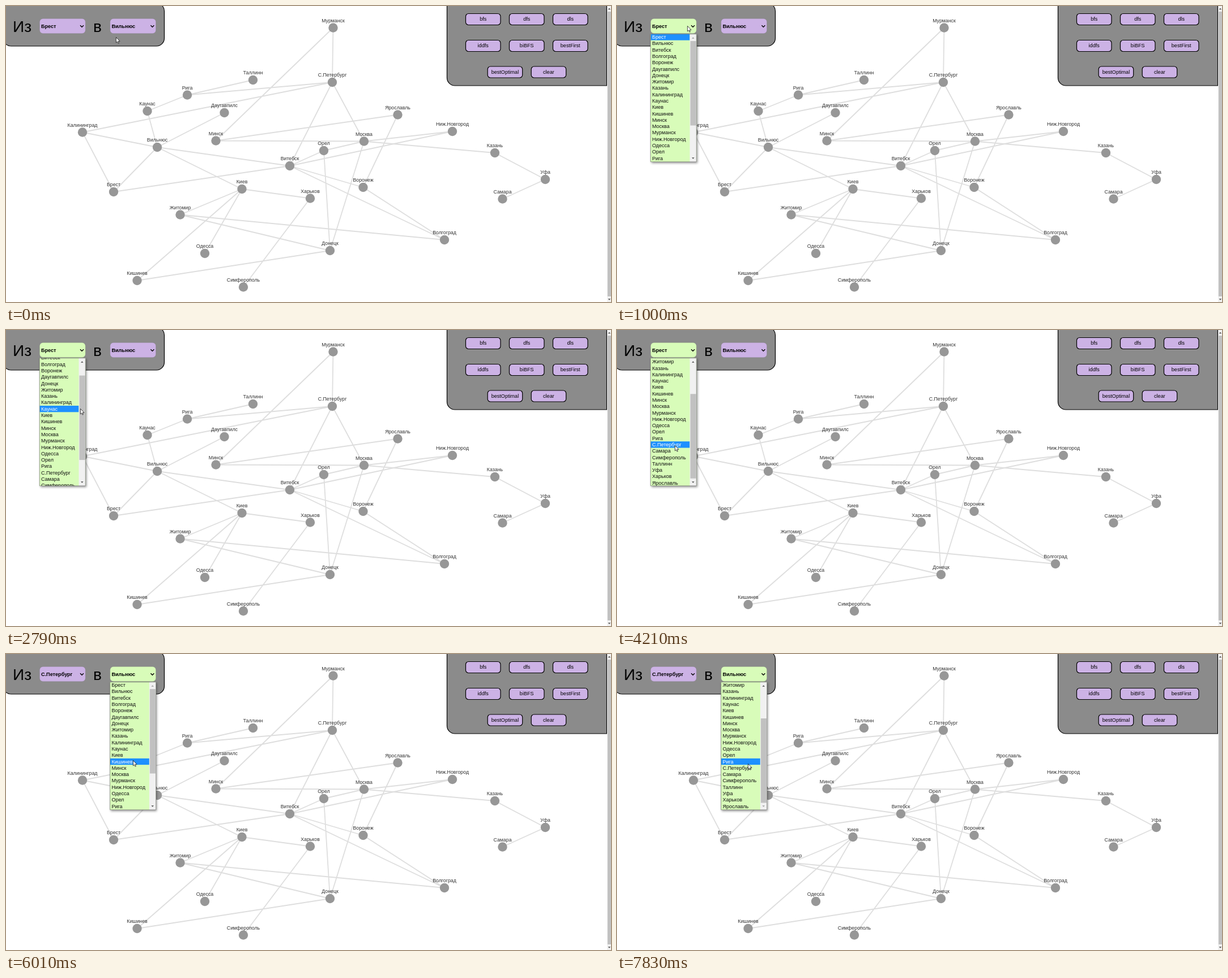
An HTML page with a canvas that plays this animation: 1068 by 524 pixels, repeating every 8000 ms.

```html
<!DOCTYPE html>
<html lang="ru">
<head>
<meta charset="utf-8">
<style>
  html, body { margin: 0; width: 100%; height: 100%; overflow: hidden; background: #fff; }
  canvas { display: block; }
</style>
</head>
<body>
<canvas id="stage" width="1068" height="524"></canvas>
<script>
const ctx = document.getElementById('stage').getContext('2d');
const LOOP = 8000;
const FONT = '"Liberation Sans", Arial, sans-serif';
const PURPLE = '#ccb2e5', GREEN = '#d8fcb9', PANEL = '#8b8b8b', BLUE = '#1e90ff';
const ROW = 11.29, LIST_TOP = 49.5, LIST_BOTTOM = 276, MAX_SCROLL = 7;

// City, position, and the cities its roads lead to, in alphabetical order.
const cities = [
  ['Брест', 190, 329, 'Витебск'],
  ['Вильнюс', 267, 250, 'Калининград Даугавпилс Брест Витебск Киев'],
  ['Витебск', 501, 283, 'Орел Воронеж Волгоград Ниж.Новгород'],
  ['Волгоград', 774, 414, ''],
  ['Воронеж', 630.5, 321, 'Волгоград'],
  ['Даугавпилс', 385.5, 189, ''],
  ['Донецк', 572, 433, ''],
  ['Житомир', 307.5, 369.5, 'Донецк Волгоград'],
  ['Казань', 863, 260, 'Уфа'],
  ['Калининград', 135, 223.5, 'Брест'],
  ['Каунас', 249.5, 186, 'Вильнюс'],
  ['Киев', 416.5, 324, 'Житомир Харьков Одесса Кишинев'],
  ['Кишинев', 231.5, 486, 'Донецк'],
  ['Минск', 370.5, 238.5, ''],
  ['Москва', 632, 239.5, 'Минск Ниж.Новгород Казань Донецк'],
  ['Мурманск', 577.5, 38.5, 'Минск С.Петербург'],
  ['Ниж.Новгород', 788, 222, ''],
  ['Одесса', 351, 438, ''],
  ['Орел', 561, 256, 'Москва Донецк'],
  ['Рига', 320, 157.5, 'Каунас'],
  ['С.Петербург', 576, 135, 'Рига Калининград Витебск Москва'],
  ['Самара', 876.5, 341.5, ''],
  ['Симферополь', 419, 497.5, ''],
  ['Таллинн', 436, 131, 'Рига'],
  ['Уфа', 952, 307, 'Самара'],
  ['Харьков', 537, 340.5, 'Симферополь'],
  ['Ярославль', 691.5, 192.5, 'Минск Воронеж']
].map(([name, x, y, roads]) => ({ name, x, y, roads: roads.split(' ').filter(Boolean) }));
const cityByName = Object.fromEntries(cities.map(c => [c.name, c]));

// Each step keeps the values of the one before unless it changes them.
const steps = [
  { t: 0, x: 194, y: 55, from: 'Брест', hover: '', open: '', focus: false, scroll: 0, row: 0 },
  { t: 200, x: 173, y: 47 },
  { t: 400, x: 146, y: 39 },
  { t: 600, x: 129, y: 36, hover: 'from' },
  { t: 800, x: 124, y: 35 },
  { t: 1000, open: 'from' },
  { t: 1390, y: 103, row: 4 },
  { t: 1590, y: 171, row: 10 },
  { t: 1990, x: 126, y: 172, scroll: 7 },
  { t: 2390, x: 131 },
  { t: 2590, y: 157, scroll: 5 },
  { t: 2790, y: 139, scroll: 2.5 },
  { t: 2990, y: 128, scroll: 1 },
  { t: 3210, y: 150, scroll: 4 },
  { t: 3410, y: 171, scroll: 6.9 },
  { t: 3610, x: 139, y: 172 },
  { t: 3810, x: 118, y: 188, row: 19 },
  { t: 4010, x: 106, y: 202, row: 20 },
  { t: 4210, x: 102, y: 204 },
  { t: 4410, open: '', hover: '', from: 'С.Петербург', focus: true, scroll: 0 },
  { t: 4810, x: 126, y: 166 },
  { t: 5010, x: 188, y: 88 },
  { t: 5210, x: 224, y: 46, hover: 'to' },
  { t: 5410, y: 42 },
  { t: 5610, open: 'to', focus: false, row: 1 },
  { t: 5810, y: 112, row: 5 },
  { t: 6010, y: 188, row: 12 },
  { t: 6210, scroll: 7 },
  { t: 6830, x: 225, y: 189, row: 19 },
  { t: 7030, x: 226, y: 190 },
  { t: 7230, x: 228, y: 191 },
  { t: 7430, x: 229, y: 192 },
  { t: 7630, x: 230, y: 193 },
  { t: 7830, x: 231, y: 194 }
];

const stateAt = time => Object.assign({}, ...steps.filter(s => s.t <= time));

function text(str, x, y, size, { color = '#000', align = 'left', weight = '' } = {}) {
  ctx.font = `${weight} ${size}px ${FONT}`;
  ctx.fillStyle = color;
  ctx.textAlign = align;
  ctx.fillText(str, x, y);
}

function rect(x, y, w, h, color) {
  ctx.fillStyle = color;
  ctx.fillRect(x, y, w, h);
}

function box(x, y, w, h, radius, fill, stroke, lineWidth = 1) {
  ctx.beginPath();
  ctx.roundRect(x, y, w, h, radius);
  if (fill) {
    ctx.fillStyle = fill;
    ctx.fill();
  }
  if (stroke) {
    ctx.strokeStyle = stroke;
    ctx.lineWidth = lineWidth;
    ctx.stroke();
  }
}

function polygon(points, x, y) {
  ctx.beginPath();
  points.forEach(([px, py]) => ctx.lineTo(x + px, y + py));
  ctx.closePath();
}

// dir is -1 for up and 1 for down
function scrollArrow(x, y, dir, color) {
  polygon([[-2.3, -1.2 * dir], [2.3, -1.2 * dir], [0, 1.2 * dir]], x, y);
  ctx.fillStyle = color;
  ctx.fill();
}

function drawGraph() {
  ctx.strokeStyle = '#dedede';
  ctx.lineWidth = 1.8;
  ctx.beginPath();
  for (const city of cities) {
    for (const name of city.roads) {
      ctx.moveTo(city.x, city.y);
      ctx.lineTo(cityByName[name].x, cityByName[name].y);
    }
  }
  ctx.stroke();
  for (const { name, x, y } of cities) {
    ctx.beginPath();
    ctx.arc(x, y, 8.2, 0, Math.PI * 2);
    ctx.fillStyle = '#979797';
    ctx.fill();
    text(name, x, y - 10, 8.8, { color: '#343434', align: 'center' });
  }
}

function drawPanels() {
  box(-5, -5, 284.5, 76, 14, PANEL, '#000', 1.2);
  text('Из', 12, 45.5, 28);
  text('в', 154, 45.5, 28);

  box(778.5, -20, 282, 161, [0, 0, 0, 14], PANEL, '#000', 1.2);
  const buttons = [
    [811, 13, ['bfs', 'dfs', 'dls']],
    [811, 60, ['iddfs', 'biBFS', 'bestFirst']],
    [849.7, 106.5, ['bestOptimal', 'clear']]
  ];
  for (const [left, y, labels] of buttons) {
    labels.forEach((label, i) => {
      const x = left + i * 77;
      box(x + 0.5, y + 0.5, 61.5, 20, 5, PURPLE, '#000', 1.2);
      text(label, x + 31.2, y + 13.2, 9.1, { align: 'center' });
    });
  }

  rect(1061, 0, 7, 524, '#f1f1f1');
  rect(1062, 10, 6, 504, '#c1c1c1');
  scrollArrow(1065, 5, -1, '#505050');
  scrollArrow(1065, 519.5, 1, '#505050');
}

function drawSelect(x, label, active, focused) {
  if (focused) box(x - 0.7, 21.3, 83, 28.4, 7, null, '#fff', 1);
  box(x + 0.3, 22.3, 81, 26.4, 6, active ? GREEN : PURPLE, focused ? '#101010' : '#777', focused ? 1.5 : 0.4);
  text(label, x + 3, 38.7, 9.1, { weight: 'bold' });
  ctx.beginPath();
  ctx.moveTo(x + 72, 34.2);
  ctx.lineTo(x + 75, 37.2);
  ctx.lineTo(x + 78, 34.2);
  ctx.strokeStyle = '#000';
  ctx.lineWidth = 1.4;
  ctx.stroke();
}

function drawList(x, scroll, activeRow) {
  const height = LIST_BOTTOM - LIST_TOP;
  ctx.save();
  ctx.shadowColor = 'rgba(0,0,0,.45)';
  ctx.shadowBlur = 4;
  ctx.shadowOffsetX = ctx.shadowOffsetY = 1.5;
  rect(x, LIST_TOP, 81.5, height, GREEN);
  ctx.restore();

  ctx.save();
  ctx.beginPath();
  ctx.rect(x, LIST_TOP, 81.5, height);
  ctx.clip();
  cities.forEach(({ name }, i) => {
    const y = 55 + (i - scroll) * ROW;
    const active = i === activeRow;
    if (active) rect(x + 0.5, y - ROW / 2, 69, ROW, BLUE);
    text(name, x + 3, y + 3.1, 9, { color: active ? '#fff' : '#101010' });
  });
  rect(x + 69.5, LIST_TOP, 12, height, '#f1f1f1');
  rect(x + 70.5, 62 + 52 * scroll / MAX_SCROLL, 10, 149.5, '#c1c1c1');
  scrollArrow(x + 75.3, 56.5, -1, scroll > 0 ? '#505050' : '#a3a3a3');
  scrollArrow(x + 75.3, 269.5, 1, scroll < MAX_SCROLL ? '#505050' : '#a3a3a3');
  ctx.restore();
  box(x + 0.25, LIST_TOP + 0.25, 81, height - 0.5, 0, null, '#666', 0.6);
}

function drawCursor(x, y) {
  polygon([[0, 0], [0, 9.5], [2.1, 7.5], [3.6, 10.8], [5, 10.2], [3.6, 7], [6.6, 7]], x + 0.4, y + 0.4);
  ctx.fillStyle = '#fff';
  ctx.fill();
  ctx.strokeStyle = '#000';
  ctx.lineWidth = 0.7;
  ctx.stroke();
}

function draw(time) {
  const s = stateAt(time);
  rect(0, 0, 1068, 524, '#fff');
  drawGraph();
  drawPanels();
  drawSelect(59, s.from, s.hover === 'from', s.focus);
  drawSelect(183.4, 'Вильнюс', s.hover === 'to', false);
  if (s.open) drawList(s.open === 'from' ? 59 : 183.4, s.scroll, s.row);
  drawCursor(s.x, s.y);
}

const start = performance.now();
function tick() {
  draw((performance.now() - start) % LOOP);
  requestAnimationFrame(tick);
}
tick();
</script>
</body>
</html>
```
